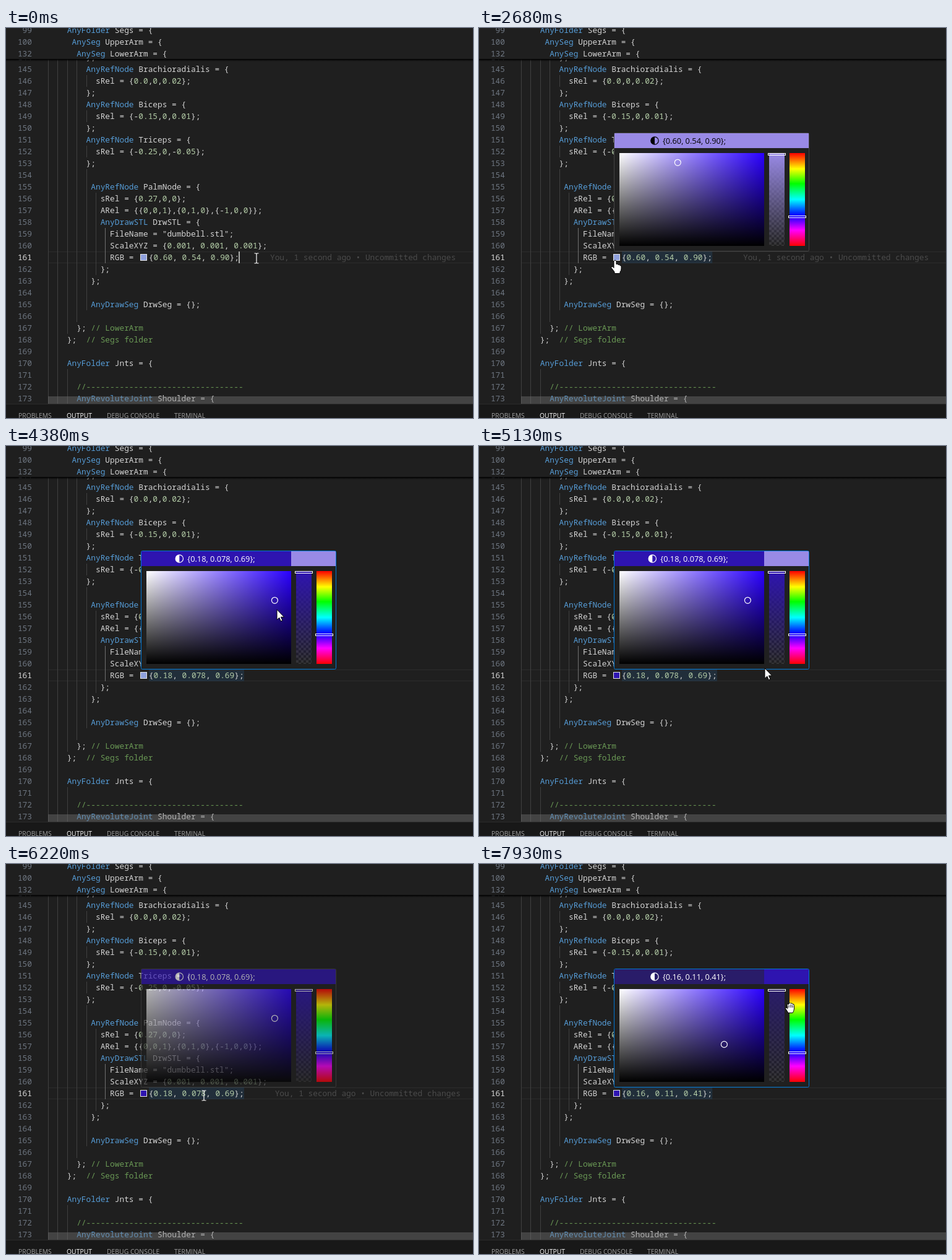
These frames come from a looping animation (755 by 630 pixels, 8 s). An HTML page:

```html
<!DOCTYPE html>
<html lang="en">
<head>
<meta charset="utf-8">
<title>Colour picker in a code editor</title>
<style>
html, body { margin: 0; width: 100%; height: 100%; overflow: hidden; background: #1f1f1f; }
svg { display: block; }
text { white-space: pre; }
.code { font: 12.83px "Noto Sans Mono", "DejaVu Sans Mono", monospace; fill: #d4d4d4; }
.type { fill: #569cd6; }
.num { fill: #b5cea8; }
.note { fill: #6a9955; }
.line { fill: #6e7681; }
.ui { font: 12.8px "Open Sans", "Noto Sans", sans-serif; }
.tab { font-size: 10.4px; fill: #9d9d9d; }
.cursor { fill: #fff; stroke: #000; stroke-width: 1; stroke-linejoin: round; }
</style>
</head>
<body>
<svg width="755" height="630" viewBox="0 0 755 630">
  <defs>
    <linearGradient id="sat"><stop stop-color="#fff"/><stop offset="1" stop-color="#2a00ff"/></linearGradient>
    <linearGradient id="val" x2="0" y2="1"><stop stop-opacity="0"/><stop offset="1"/></linearGradient>
    <linearGradient id="hue" x2="0" y2="1">
      <stop stop-color="#f00"/><stop offset=".17" stop-color="#ff0"/><stop offset=".33" stop-color="#0f0"/>
      <stop offset=".5" stop-color="#0ff"/><stop offset=".67" stop-color="#00f"/>
      <stop offset=".83" stop-color="#f0f"/><stop offset="1" stop-color="#f00"/>
    </linearGradient>
    <linearGradient id="alpha" x2="0" y2="1"><stop id="a0"/><stop id="a1" offset="1" stop-opacity="0"/></linearGradient>
    <linearGradient id="shade" x2="0" y2="1"><stop/><stop offset="1" stop-opacity="0"/></linearGradient>
    <pattern id="check" x="469" y="202" width="8" height="8" patternUnits="userSpaceOnUse">
      <path d="M0 0h4v8h4v-4H0z" fill="#343434"/>
    </pattern>
  </defs>

  <rect width="755" height="630" fill="#1f1f1f"/>
  <path d="M68 361.5H755M68 379.5H755" stroke="#2c2c2c"/>
  <rect id="mark" x="231" y="361" height="19" fill="#264f78" fill-opacity=".3"/>
  <g id="guides" fill="#404040"></g>
  <g id="lines" class="code"></g>
  <rect id="swatch" x="217.5" y="365.5" width="10" height="10" stroke="#e4e4e4"/>
  <text id="value" class="code num" x="230.7" y="375"></text>
  <text id="blame" class="code" y="375" style="fill:#4b4b4b">You, 1 second ago • Uncommitted changes</text>
  <rect id="caret" x="376" y="361" width="2" height="19" fill="#aeafad"/>

  <rect width="755" height="51" fill="#1f1f1f"/>
  <rect y="50" width="755" height="4" fill="url(#shade)"/>
  <g id="sticky" class="code"></g>
  <rect x="68" y="595" width="687" height="12" fill="#797979" fill-opacity=".4"/>
  <rect y="607" width="755" height="23" fill="#181818"/>
  <rect y="607" width="755" height="1" fill="#2b2b2b"/>
  <g class="ui">
    <text class="tab" x="20" y="630">PROBLEMS</text>
    <text class="tab" x="98" y="630" style="fill:#fff">OUTPUT</text>
    <text class="tab" x="163" y="630">DEBUG CONSOLE</text>
    <text class="tab" x="272" y="630">TERMINAL</text>
  </g>

  <g id="picker">
    <rect id="frame" x="218.5" y="169.5" width="315" height="191" rx="2" fill="#202020"/>
    <rect id="picked" x="219" y="170" width="242" height="24"/>
    <rect id="before" x="461" y="170" width="72" height="24"/>
    <g id="label">
      <path id="icon" d="M0-6.2A6.2 6.2 0 0 0 0 6.2z"/>
      <circle id="ring" r="6.2" fill="none" stroke-width="1.2"/>
      <text id="name" class="ui" x="348" y="186.7" text-anchor="middle"></text>
    </g>
    <rect x="227" y="202" width="234" height="150" fill="url(#sat)"/>
    <rect x="227" y="202" width="234" height="150" fill="url(#val)"/>
    <rect x="469" y="202" width="25" height="150" fill="url(#check)"/>
    <rect x="469" y="202" width="25" height="150" fill="url(#alpha)"/>
    <rect x="502" y="202" width="25" height="150" fill="url(#hue)"/>
    <g fill="none" stroke="#fff">
      <rect x="467.5" y="202.5" width="28" height="3"/>
      <rect x="500.5" y="303.5" width="28" height="3"/>
      <circle id="spot" r="5" stroke-width="1.2"/>
    </g>
  </g>

  <circle id="press" cx="396" cy="291" r="12" fill="#ff0" fill-opacity=".5"/>
  <g id="cursor">
    <path id="beam" d="M-3.5-8H-1L0-7L1-8H3.5M0-7V7M-3.5 8H-1L0 7L1 8H3.5" fill="none" stroke="#fff" stroke-width="1.2"/>
    <path id="arrow" class="cursor" d="M0 0V16.5L3.8 13L6.4 18.8L9 17.6L6.4 12H11.6Z"/>
    <path id="hand" class="cursor" d="M-2 1.5Q0-1.5 2 1.5V6.5Q4 5.5 5 7.5Q7 6.8 7.8 8.6Q10 8 10 10.5V14Q10 17 8 19V21.5H-1V19L-6 12.5Q-7 9.5-4 10.5L-2 12.5Z"/>
    <path id="grab" class="cursor" d="M-5-5Q-4-7-2.5-5L-2-6.5Q0-9 1-6.5Q3-8.5 4-5.5Q6.5-6.5 6.5-3.5V2Q6 6 4 8.5H-3L-7.5 1.5Q-7.5-1-5 .5L-4 1.5ZM-2-4V0M1.2-5V0M4-4V0"/>
  </g>
</svg>

<script>
const $ = id => document.getElementById(id);
const set = (id, attrs) => { for (const k in attrs) $(id).setAttribute(k, attrs[k]); };
const show = (id, on) => { $(id).style.display = on ? '' : 'none'; };
const CHAR = 7.698, LEFT = 68, ROW = 19;

const code = `        };
        AnyRefNode Brachioradialis = {
          sRel = {0.0,0,0.02};
        };
        AnyRefNode Biceps = {
          sRel = {-0.15,0,0.01};
        };
        AnyRefNode Triceps = {
          sRel = {-0.25,0,-0.05};
        };

         AnyRefNode PalmNode = {
           sRel = {0.27,0,0};
           ARel = {{0,0,1},{0,1,0},{-1,0,0}};
           AnyDrawSTL DrwSTL = {
             FileName = "dumbbell.stl";
             ScaleXYZ = {0.001, 0.001, 0.001};
             RGB =
           };
         };

         AnyDrawSeg DrwSeg = {};

      }; // LowerArm
    };  // Segs folder

    AnyFolder Jnts = {

      //${'-'.repeat(33)}
      AnyRevoluteJoint Shoulder = {`.split('\n');

const paint = s => s.replace(/(\/\/.*)|(Any\w+)|(\d[\d.]*)/g, (m, note, type) =>
  `<tspan class="${note ? 'note' : type ? 'type' : 'num'}">${m}</tspan>`);

function row(n, src, y) {
  const body = src.trimStart();
  const x = LEFT + (src.length - body.length) * CHAR;
  const tint = n === 161 ? ' style="fill:#d8d8d8"' : '';
  return `<text class="line" x="42" y="${y}" text-anchor="end"${tint}>${n}</text>` +
    `<text x="${x}" y="${y}">${paint(body)}</text>`;
}

$('lines').innerHTML = code.map((s, i) => row(144 + i, s, 52 + i * ROW)).join('');
$('sticky').innerHTML = row(99, '    AnyFolder Segs = {', 8) +
  row(100, '     AnySeg UpperArm = {', 27) + row(132, '      AnySeg LowerArm = {', 46);

// Indent guides: column, first line, last line
$('guides').innerHTML = [
  [0, 144, 173], [2, 144, 173], [4, 144, 167], [4, 171, 173], [6, 144, 166],
  [8, 146, 146], [8, 149, 149], [8, 152, 152], [8, 154, 165], [10, 156, 162], [12, 159, 161]
].map(([col, a, b]) => `<rect x="${Math.round(LEFT + col * CHAR)}" y="${38 + (a - 144) * ROW}" width="1"
  height="${(b - a + 1) * ROW}"${col === 12 ? ' fill="#707070"' : ''}/>`).join('');

// Picked colours: rgb values and their place in the saturation box
const colours = [
  { rgb: [.6, .54, .9], x: 321.3, y: 217.3 },
  { rgb: [.18, .078, .69], x: 434.4, y: 249.3 },
  { rgb: [.16, .11, .41], x: 396.4, y: 291.4 }
].map(c => ({
  ...c,
  css: `rgb(${c.rgb.map(v => Math.round(v * 255))})`,
  text: `{${c.rgb.map(v => v.toPrecision(2)).join(', ')}};`
}));

// Pointer moves: start, steps, end x, end y
const STEP = 67;
const moves = [
  [1160, 6, 322, 408], [1580, 6, 242, 398], [2000, 4, 227, 381], [2280, 2, 220, 375],
  [2960, 12, 434, 249], [4380, 7, 462, 356], [4990, 3, 462, 359], [5280, 8, 320, 374],
  [6490, 7, 396, 291], [7390, 9, 503, 232]
];

function pointer(t) {
  let x = 405, y = 372;
  for (const [start, steps, ex, ey] of moves) {
    if (t < start) break;
    const k = Math.min(1, (Math.floor((t - start) / STEP) + 1) / steps);
    x += (ex - x) * k;
    y += (ey - y) * k;
  }
  return [x, y];
}

const within = (t, a, b) => t >= a && t < b;
const pick = (t, a, b) => colours[t < a ? 0 : t < b ? 1 : 2];
const fade = age => Math.min(1, (Math.floor(age / 70) + 1) / 3);

function draw(t) {
  const open = within(t, 2540, 5490) ? fade(t - 2540) : t >= 6150 ? fade(t - 6150) : 0;
  const focused = within(t, 3990, 5490) || t >= 7050;
  const now = pick(t, 3850, 6910), before = pick(t, 5490, 9e3), written = pick(t, 3990, 7050);
  const width = written.text.length * CHAR;

  if ($('value').dataset.text !== written.text) {
    $('value').dataset.text = written.text;
    $('value').innerHTML = written.text.replace(/[{},;]+/g, '<tspan fill="#d4d4d4" style="fill:#d4d4d4">$&</tspan>');
  }
  set('swatch', { fill: t < 4990 ? '#8fa0dc' : colours[1].css });
  set('mark', { width });
  show('mark', open);
  set('blame', { x: 280.7 + width });
  show('blame', !focused);
  show('caret', t < 370 || t < 3850 && Math.floor((t - 370) / 530) % 2);

  $('picker').style.opacity = open;
  set('frame', { stroke: focused ? '#0078d4' : '#454545' });
  set('picked', { fill: now.css });
  set('before', { fill: before.css });
  const ink = now === colours[0] ? '#000' : '#fff';
  const at = `translate(${284 - (now.text.length - 19) * 3.7} 182)`;
  set('label', { fill: ink });
  set('icon', { transform: at });
  set('ring', { transform: at, stroke: ink });
  $('name').textContent = now.text;
  set('a0', { 'stop-color': now.css });
  set('a1', { 'stop-color': now.css });
  set('spot', { cx: now.x, cy: now.y });

  const [x, y] = pointer(t);
  const kind = open && y < 361 ? (x >= 469 ? 'grab' : 'arrow')
    : within(x, 217, 229) && within(y, 364, 377) ? 'hand' : 'beam';
  for (const id of ['beam', 'arrow', 'hand', 'grab']) show(id, id === kind);
  set('cursor', { transform: `translate(${x} ${y})` });
  set('press', { cx: x, cy: y });
  show('press', within(t, 3850, 4050) || within(t, 6910, 7120));
}

const begin = performance.now();
function tick() {
  draw((performance.now() - begin) % 8000);
  requestAnimationFrame(tick);
}
tick();
</script>
</body>
</html>
```
